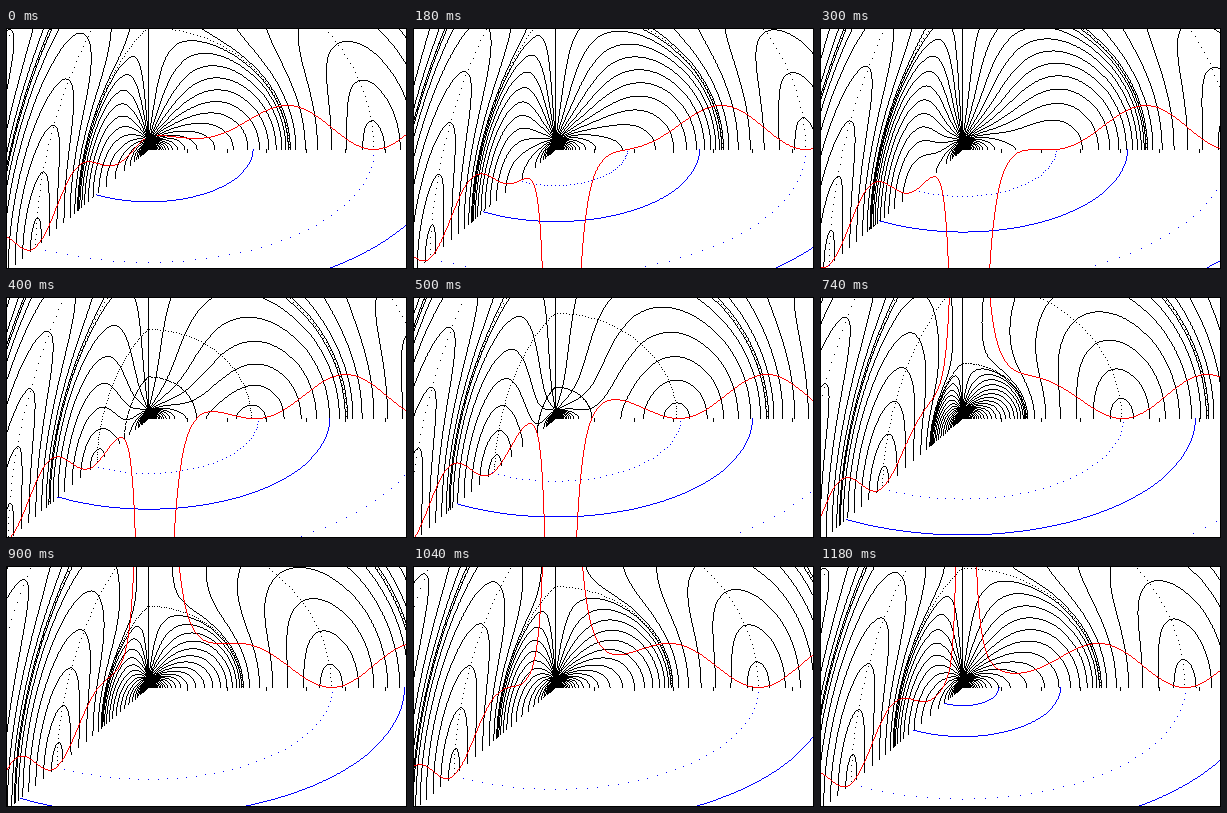
Animation, 401 px wide and 241 px high, one loop 1.2 s. Source, as a matplotlib script:

```python
import numpy as np
import matplotlib.pyplot as plt
from matplotlib.animation import FuncAnimation

W, H, DPI = 401, 241, 100
FRAMES, STEP = 60, 20
CX, CY = 142, 121
K = 0.0199          # wave number in 1/px
GAP = 9             # half distance of the two charges
FLUX = 44           # height of the energy flow curve
TILT = np.sqrt(0.75)
R_MAX = 440
BLACK, RED, BLUE = (0, 0, 0), (255, 0, 0), (0, 0, 255)

fig = plt.figure(figsize=(W / DPI, H / DPI), dpi=DPI, facecolor="white")
ax = fig.add_axes([0, 0, 1, 1])     # only used to compute contours
ax.set_visible(False)
canvas = np.full((H, W, 3), 255, np.uint8)
picture = fig.figimage(canvas, origin="upper")

radii = np.arange(0.5, R_MAX, 0.5)
theta = np.radians(np.linspace(0, 90, 61))
fan_shape = np.sin(np.radians(3 * np.arange(1, 30))) ** 2
loop_shape = np.sin(np.radians(81.5 - 12.2 * np.arange(7))) ** 2
dot_angles = np.radians(np.arange(0.75, 90, 1.5))


# Radial factors of the oscillating dipole, x = kr
def flux(r, wt):
    x = K * r
    return np.sin(x - wt) + np.cos(x - wt) / x


def electric(r, wt):
    x = K * r
    p = x - wt
    return np.cos(p) - np.sin(p) / x - np.cos(p) / x**2


def magnetic(r, wt):
    x = K * r
    return np.cos(x - wt) - np.sin(x - wt) / x


def magnetic_slope(r, wt):
    x = K * r
    return np.sin(x - wt) * (x**2 - 2) + 2 * x * np.cos(x - wt)


def roots(f, wt):
    v = f(radii, wt)
    i = np.nonzero(v[:-1] * v[1:] < 0)[0]
    return radii[i] + 0.5 * v[i] / (v[i] - v[i + 1])


# Projections of the two upright planes and of the ground
def right(rho, z):
    return CX + rho, CY - TILT * z


def left(rho, z):
    return CX - 0.5 * rho, CY + 0.5 * TILT * rho - TILT * z


def ground(r, angle):
    return CX + r * np.cos(angle), CY + 0.5 * r * np.sin(angle)


def dots(x, y, color=BLACK):
    x, y = np.rint(x).astype(int), np.rint(y).astype(int)
    seen = (x >= 0) & (x < W) & (y >= 0) & (y < H)
    canvas[y[seen], x[seen]] = color


def stroke(x, y, color=BLACK):
    """Polyline one pixel wide, without corner pixels."""
    s = np.concatenate([[0], np.cumsum(np.hypot(np.diff(x), np.diff(y)))])
    t = np.linspace(0, s[-1], int(2 * s[-1]) + 2)
    xs = np.rint(np.interp(t, s, x)).astype(int).tolist()
    ys = np.rint(np.interp(t, s, y)).astype(int).tolist()
    path = []
    for p in zip(xs, ys):
        if path and p == path[-1]:
            continue
        if (len(path) > 1 and abs(p[0] - path[-2][0]) < 2
                and abs(p[1] - path[-2][1]) < 2):
            path.pop()
        path.append(p)
    dots(*np.array(path).T, color)


def field_lines(a, b, levels, wt, core=0):
    """Contours of the flux between radii a and b in both planes."""
    if len(levels) == 0 or b - a < 1:
        return
    r = (0.5 + (b - 0.5) * np.linspace(0, 1, 130) ** 1.5 if a < 1
         else np.linspace(a, b, 90))
    r, th = np.meshgrid(r, theta)
    rho, z = r * np.sin(th), r * np.cos(th)
    psi = flux(r, wt) * np.sin(th) ** 2
    if core:
        # two separate charges instead of a point near the centre
        pair = ((z + GAP) / np.hypot(rho, z + GAP)
                - (z - GAP) / (np.hypot(rho, z - GAP) + 1e-9)) / (2 * GAP)
        fade = np.exp(-(r / (0.6 * core)) ** 4)
        psi += np.cos(wt) / K * (pair - np.sin(th) ** 2 / r) * fade
    lines = ax.contour(rho, z, psi, levels=np.unique(levels))
    for segments in lines.allsegs:
        for line in segments:
            if len(line) > 1:
                stroke(*right(*line.T))
                stroke(*left(*line.T))
    lines.remove()


def draw_field(wt, zeros, turns):
    bounds = [0.5, *zeros, R_MAX]
    charge = np.cos(wt) / (K * GAP)
    charged = abs(charge) > 0.05
    for n, (a, b) in enumerate(zip(bounds[:-1], bounds[1:])):
        inside = [t for t in turns if a < t < b]
        top = flux(inside[-1], wt) if inside else np.sign(flux((a + b) / 2, wt))
        loops = top * loop_shape
        fan = charge * fan_shape
        if n > 0 or not charged:
            field_lines(a, b, loops, wt)
        elif len(inside) < 2:
            field_lines(a, b, fan, wt, b)
        else:
            # a neck parts the lines of the charge from the new loops
            neck = inside[0]
            low = flux(neck, wt)
            field_lines(a, neck, fan[fan >= low], wt, b)
            field_lines(a, b, loops[loops < low], wt, b)
            field_lines(neck, b, loops[loops >= low], wt)
    stroke([CX, CX], [0, CY if charged else 93])


def draw(i):
    wt = np.pi * i / FRAMES
    canvas[:] = 255

    zeros, turns = roots(flux, wt), roots(electric, wt)
    draw_field(wt, zeros, turns)
    for r in (*zeros, *turns):
        for plane in (right, left):
            dots(*plane(r * np.sin(dot_angles), r * np.cos(dot_angles)))

    for n in range(1, 7):
        x = CX + n * np.pi / (4 * K)
        stroke([x, x], [CY, CY + 3])

    for r in roots(magnetic_slope, wt):
        stroke(*ground(r, np.radians(np.arange(0, 121, 2))), BLUE)
    for r in roots(magnetic, wt):
        dots(*ground(r, np.radians(np.arange(0, 121, 3))), BLUE)

    r = np.arange(GAP, 300, 1.0)
    power = np.clip(FLUX * electric(r, wt) * magnetic(r, wt), -400, 400)
    for plane in (right, left):
        x, y = plane(r, 0)
        stroke(x, y - power, RED)

    canvas[[0, -1]] = BLACK
    canvas[:, [0, -1]] = BLACK
    picture.set_data(canvas.copy())
    return [picture]


anim = FuncAnimation(fig, draw, frames=FRAMES, interval=STEP,
                     init_func=lambda: [], repeat=True, repeat_delay=0)
plt.show()
```
